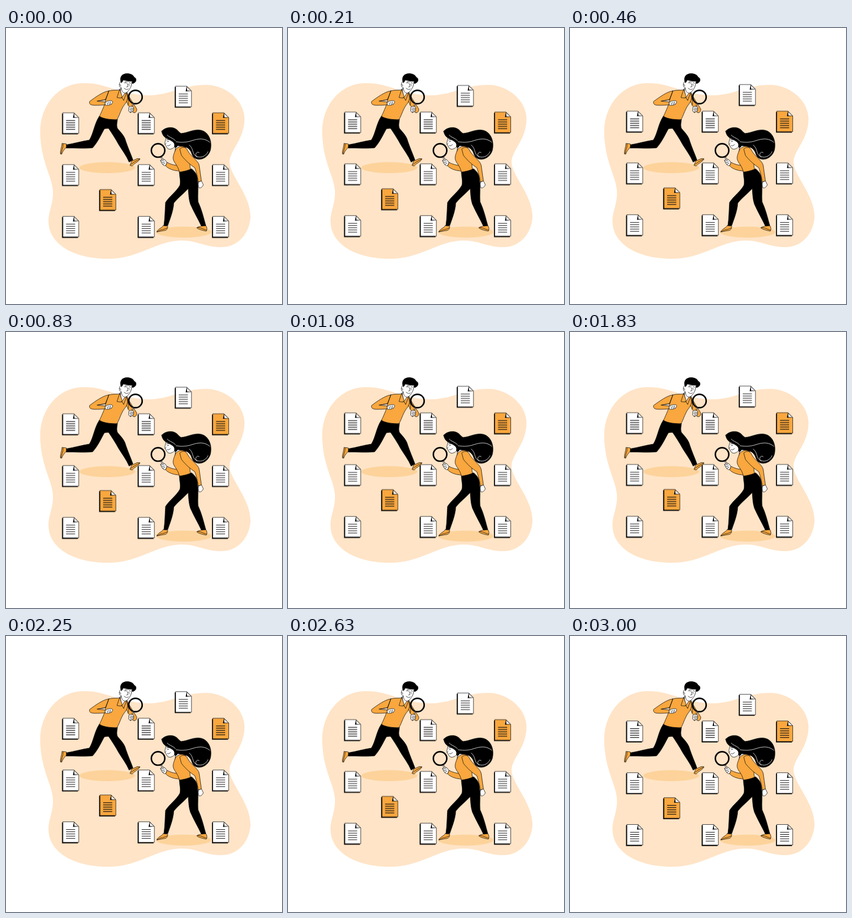
An HTML page that plays this animation: 500x500 px, repeating every 3040 ms.

```html
<!DOCTYPE html>
<html lang="en">
<head>
<meta charset="utf-8">
<title>Searching documents</title>
<style>
  html, body { margin: 0; width: 100%; height: 100%; overflow: hidden; background: #fff; }
  svg { display: block; width: 100vw; height: 100vh; }
  .docs { color: #fff; animation: lift 1520ms linear -40ms infinite alternate; }
  .docs .hot { color: #f9a73e; }
  @keyframes lift { to { transform: translateY(-10px); } }
  .ink { stroke: #111; stroke-width: .8; stroke-linejoin: round; stroke-linecap: round; }
  .rows { fill: none; stroke: #111; stroke-width: 1.1; }
  .orange { fill: #f9a73e; }
  .white { fill: #fff; }
  .black { fill: #000; }
  .line { fill: none; }
  .lens { fill: none; stroke: #000; stroke-width: 2.7; }
</style>
</head>
<body>
<svg viewBox="0 0 500 500">
  <defs>
    <g id="doc">
      <path d="M-1.800 1.300H18L27 9V38.900H-1.800Z"/>
      <path class="ink" fill="currentColor" d="M0 0H19.800L28.500 8.500V37.200H0Z"/>
      <path d="M19.800 0L18 9.200L28.500 8.500Z"/>
      <path class="white" d="M20.200 1.300L20.600 7.800L27.500 8.100Z"/>
      <path class="rows" d="M5.500 14H22M5.500 18H22M5.500 22H22M5.500 26H22M5.500 30H22"/>
    </g>
  </defs>

  <path fill="#ffe4c7" d="M140 100C181 98 207 122 262 122C302 120 320 103 362 103C398 103 432 131 432 165C432 202 405 222 405 243C405 267 443 302 443 342C441 374 419 397 390 397C360 397 345 384 315 385C270 387 240 418 185 418C120 418 77 390 77 350C77 330 86 320 85 295C84 270 62 240 62 188C62 140 95 100 140 100Z"/>
  <g fill="#fdd39b">
    <ellipse cx="183.500" cy="253" rx="50.500" ry="10"/>
    <ellipse cx="322" cy="369.700" rx="50" ry="10"/>
  </g>

  <g class="docs">
    <use href="#doc" x="307.500" y="105.700"/>
    <use href="#doc" x="103.300" y="153.900"/>
    <use href="#doc" x="240.300" y="153.900"/>
    <use href="#doc" x="375" y="153.900" class="hot"/>
    <use href="#doc" x="103.300" y="247.700"/>
    <use href="#doc" x="240.300" y="247.700"/>
    <use href="#doc" x="375" y="247.700"/>
    <use href="#doc" x="170.500" y="292.900" class="hot"/>
    <use href="#doc" x="103.300" y="341.500"/>
    <use href="#doc" x="240.300" y="341.500"/>
    <use href="#doc" x="375" y="341.500"/>
  </g>

  <!-- running man -->
  <g class="ink">
    <path class="orange" d="M109 210L101.500 209C101 216 98 223 98.500 228L101 228.500C103 222 107 219 109.500 216Z"/>
    <path class="line" d="M103.500 210C104 217 100 222 100 228"/>
    <path class="orange" d="M228 241L238 236.500L243 237C240 243 232 245 228.500 250L225 249Z"/>
    <path class="line" d="M226.500 247C231 243 237 240 242 237.500"/>
    <path class="black" d="M169 160L202 165C201 173 200 177 202 182C208 189 215 196 217 205C221 217 226 228 230 239L223 243C218 231 210 221 204 211C198 200 192 191 186 182C183 182 179 182 178 183C172 194 166 207 157 217C143 219 124 217 109 217.500L109.500 211.500C124 209 138 205 151 203C159 190 160 173 169 160Z"/>
    <path class="orange" d="M219 117C224 127 233 140 237 147C237 152 234 154 231 153.500L221 139L217 130Z"/>
    <path class="orange" d="M186 114C193 112 199 113 206 112L219 117C223 127 218 135 213 141C207 151 205 160 201 166C190 166 177 165 169.500 160C175 147 179 140 181 129Z"/>
    <path class="orange" d="M186 114C176 115 161 126 151.500 133C150 138 154 140 160 140C167 140 174 140 180 139L180 134L165 132.500L180 130Z"/>
    <path class="line" d="M186 114C185 119 182 125 180 130L165 132.500M219 120C220 128 224 135 221 140"/>
    <path class="white" d="M180 134.500C183 132 188 131 192 132C194 133 193 137 191 138C187 140 184 141 180 139.500Z"/>
    <path class="line" d="M183 135L184.500 139M186 134L187.500 138.500M189 133.500L190 138"/>
    <path class="white" d="M207 110C208 117 208 123 209 127C213 124 218 121 219 116Z"/>
    <path class="orange" d="M206 111L201 126L208 127L210 124ZM219 115L214 120L210 126L213 131Z"/>
    <path class="white" d="M210 95C206 98 204 102 206 106C207 108 208 108 209 108C209 113 211 117 215 118C219 118 223 113 226 107C228 103 228 99 228 95Z"/>
    <path class="black" d="M209 99C206 95 207 86 213 84C219 81 230 83 232 89C237 91 236 96 234 98C232 100 230 101 228 100C229 98 229 97 228 96C222 98 216 94 212 94C211 97 211 98 209 99Z"/>
    <path class="line" d="M214.500 100C216 98 218 99 218.500 100.500M222.500 102L224 104M215 98C217 96 219 98 220 98M223 99L225.500 100M220.500 101L221 106L218.500 107M214 109C217 112 220 112 222 110M206.500 102L208 105"/>
  </g>
  <circle class="lens" cx="234.500" cy="125" r="12.200"/>
  <path class="ink white" d="M231 137L226 153.500L224.500 153L229.500 136.500Z"/>
  <path class="ink white" d="M223 143C225 141 230 142 231.500 144L230.500 151C228 153 224 153 222.500 151Z"/>
  <path class="ink line" d="M225 145L230.500 145.500M224.500 147.500L230.500 148M225 150L229 150.500"/>

  <!-- standing woman -->
  <g class="ink">
    <path class="orange" d="M285 358L293 359C293 364 291 367 286 367L273 369.500C275 364 283 362 285 358Z"/>
    <path class="line" d="M274 369C281 364 286 366 292 362"/>
    <path class="orange" d="M354 358L362 358C365 362 364 366 363 368C357 367 349 365 345.500 362C348 359 352 361 354 358Z"/>
    <path class="line" d="M347 361.500C353 361 357 365 363 366"/>
    <path class="black" d="M314 260L336 255C343 260 347 267 347 276C349 289 347 303 348 315C355 330 358 344 362 358L354 359C348 346 340 333 334 319C331 310 331 301 330 291C322 300 311 308 304 317C303 332 297 346 293 358L286 358C288 344 288 330 289 316C296 305 309 296 315 285C317 277 314 269 314 260Z"/>
    <path class="white" d="M305 208C307 215 307 219 306 224L322 218L317 204Z"/>
    <path class="orange" d="M292 243.500C298 247 306 249 312 249L315 259C306 259 295 256 289.500 250Z"/>
    <path class="orange" d="M308 219C305 226 302 231 303 238C305 245 312 250 314 261C322 260 329 258 334 256C333 249 333 242 332 234L325 216C320 213 313 214 308 219Z"/>
    <path class="orange" d="M315 219C320 214 327 216 329 222C335 233 349 241 350 249L354 277L348.500 279C347 269 345 261 342 253C334 248 325 240 318 231Z"/>
    <path class="white" d="M349 279L354 277L357.500 284C355 289 352 291 349 289C348 285 348 282 349 279Z"/>
    <path class="white" d="M290 199C289 204 287 208 288 211C290 213 291 217 294 219C299 221 305 217 307 212L309 201L297 196Z"/>
    <path class="line" d="M292 206L295 205M290 209L288.500 211M292 213C294 214 297 213 298 211M291 203L295 202"/>
    <path class="black" d="M282 187C287 181 298 178 306 182C311 184 313 189 317 191C329 190 340 183 352 185C365 187 373 201 371 217C370 231 356 241 345 237C336 234 338 227 333 221C328 214 319 215 311 213C308 218 306 218 305 214C307 207 299 204 293 201C286 198 283 193 282 187Z"/>
    <path class="line" style="stroke:#fff" d="M308 206C319 208 328 207 337 204C349 200 360 199 369 207M332 212C341 219 336 229 346 233C355 236 363 231 366 224M346 234C340 229 347 222 350 226M292 194C295 198 302 199 307 204"/>
    <path class="white" d="M281 235L282.500 234L289 247L287 248Z"/>
    <path class="white" d="M280 240C282 237 287 237 289 240L291.500 244L289 249.500C285 250 282 246 280 240Z"/>
    <path class="line" d="M281.500 241L286 239.500M282.500 244L287 242.500M284 247L288 245"/>
  </g>
  <circle class="lens" cx="275.500" cy="221.800" r="12.200"/>
</svg>
</body>
</html>
```
